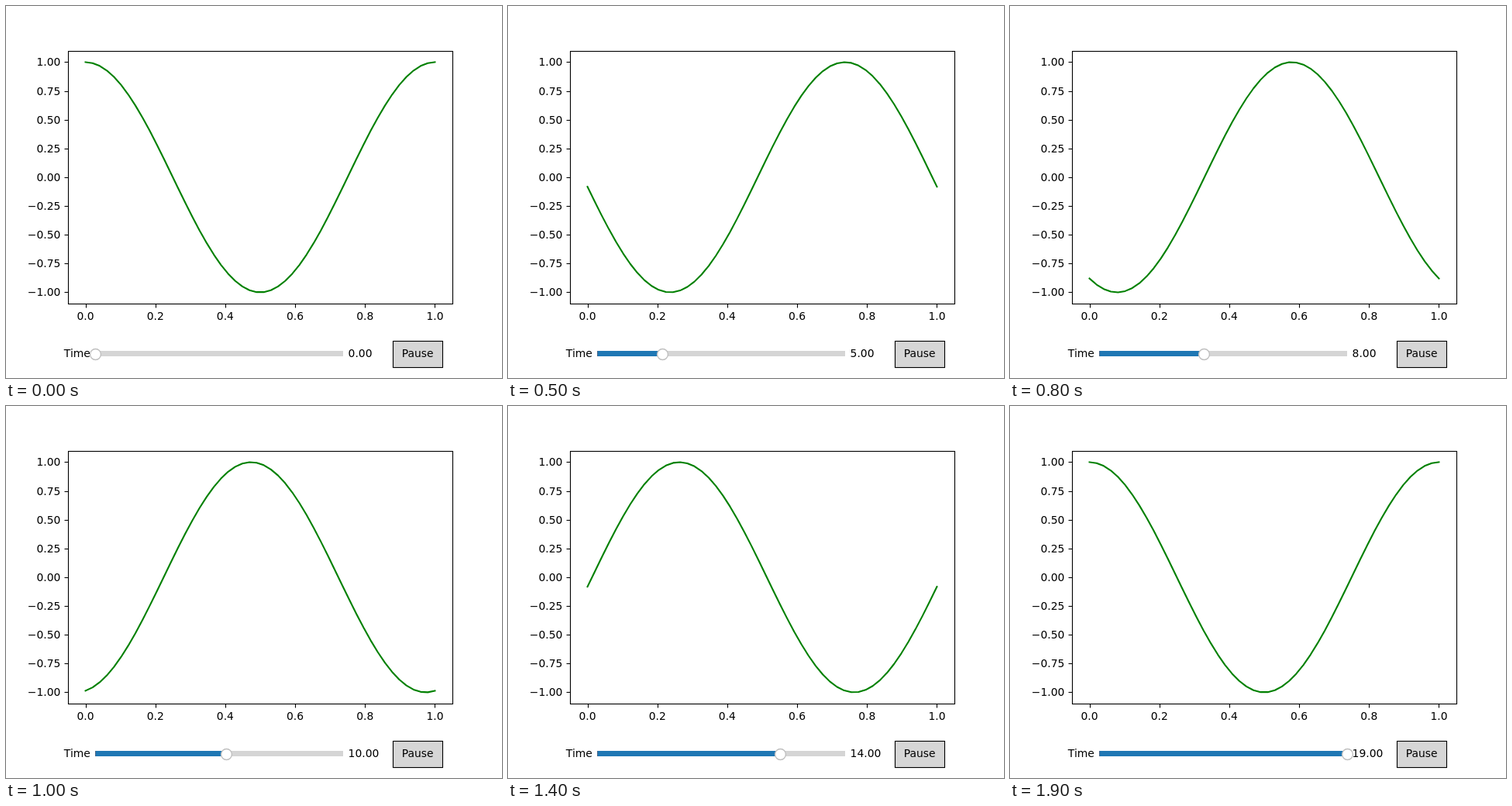
Animation, 640 px wide and 480 px high, one loop 2 s. Source, as an HTML page:

```html
<!DOCTYPE html>
<html lang="en">
<head>
<meta charset="utf-8">
<title>Cosine wave</title>
<style>
  html, body { margin: 0; width: 100%; height: 100%; overflow: hidden; background: #fff; }
  svg { display: block; width: 640px; height: 480px; }
  text { font: 13.889px "DejaVu Sans", sans-serif; fill: #000; }
  .edge { fill: none; stroke: #000; stroke-width: 1.11; }
  .tick { stroke: #000; stroke-width: 1.11; }
  .wave { fill: none; stroke: #008000; stroke-width: 2.083; stroke-linecap: square; stroke-linejoin: round; }
  .end { text-anchor: end; }
  .mid { text-anchor: middle; }
</style>
</head>
<body>
<svg id="stage" viewBox="0 0 640 480"></svg>
<script>
const stage = document.getElementById("stage");
const STEPS = 19, STEP_MS = 100, LOOP_MS = 2000, POINTS = 50;
const TRACK = { x: 115.2, width: 320, y: 445, height: 7 };

function add(tag, attrs, text) {
  const node = document.createElementNS(stage.namespaceURI, tag);
  for (const key in attrs) node.setAttribute(key, attrs[key]);
  if (text !== undefined) node.textContent = text;
  stage.appendChild(node);
  return node;
}

const px = x => 80 + 496 * (x + 0.05) / 1.1;
const py = y => 57.6 + (1.0999 - y) * 148.515;
const label = v => v.toFixed(2).replace("-", "\u2212");

// Plot
const wave = add("path", { class: "wave" });
for (let i = 0; i <= 5; i++) {
  const x = px(i / 5), snapped = Math.round(x) + 0.5;
  add("line", { class: "tick", x1: snapped, x2: snapped, y1: 384.5, y2: 389.5 });
  add("text", { class: "mid", x, y: 405 }, (i / 5).toFixed(1));
}
for (let i = -4; i <= 4; i++) {
  const y = py(i / 4), snapped = Math.round(y) + 0.5;
  add("line", { class: "tick", x1: 75.5, x2: 80.5, y1: snapped, y2: snapped });
  add("text", { class: "end", x: 70.3, y: Math.round(y + 5) }, label(i / 4));
}
add("rect", { class: "edge", x: 80.5, y: 58.5, width: 496, height: 326 });

// Slider
const { y, height } = TRACK;
add("rect", { x: 115, y, width: 320, height, fill: "#d5d5d5" });
const fill = add("rect", { x: 115, y, height, fill: "#1f77b4" });
add("rect", { x: 115, y, width: 1, height, fill: "#4a6484" });
const knob = add("circle", { cy: 449.5, r: 6.94, fill: "#fff", stroke: "#bfbfbf", "stroke-width": 1.39 });
add("text", { class: "end", x: 108.8, y: 453 }, "Time");
const value = add("text", { x: 441.6, y: 453 });

// Button
add("rect", { class: "edge", x: 499.5, y: 432.5, width: 64, height: 34, style: "fill:#d6d6d6" });
add("text", { class: "mid", x: 531.2, y: 453 }, "Pause");

function draw(ms) {
  const step = Math.floor((ms % LOOP_MS) / STEP_MS);
  const points = Array.from({ length: POINTS }, (_, i) => {
    const x = i / (POINTS - 1);
    return px(x).toFixed(2) + " " + py(Math.cos(2 * Math.PI * (x + step / STEPS))).toFixed(2);
  });
  wave.setAttribute("d", "M" + points.join("L"));
  const pos = Math.round(TRACK.x + TRACK.width * step / STEPS);
  fill.setAttribute("width", pos - 115);
  knob.setAttribute("cx", pos + 0.5);
  value.textContent = step.toFixed(2);
}

const start = performance.now();
function tick() {
  draw(performance.now() - start);
  requestAnimationFrame(tick);
}
draw(0);
requestAnimationFrame(tick);
</script>
</body>
</html>
```
